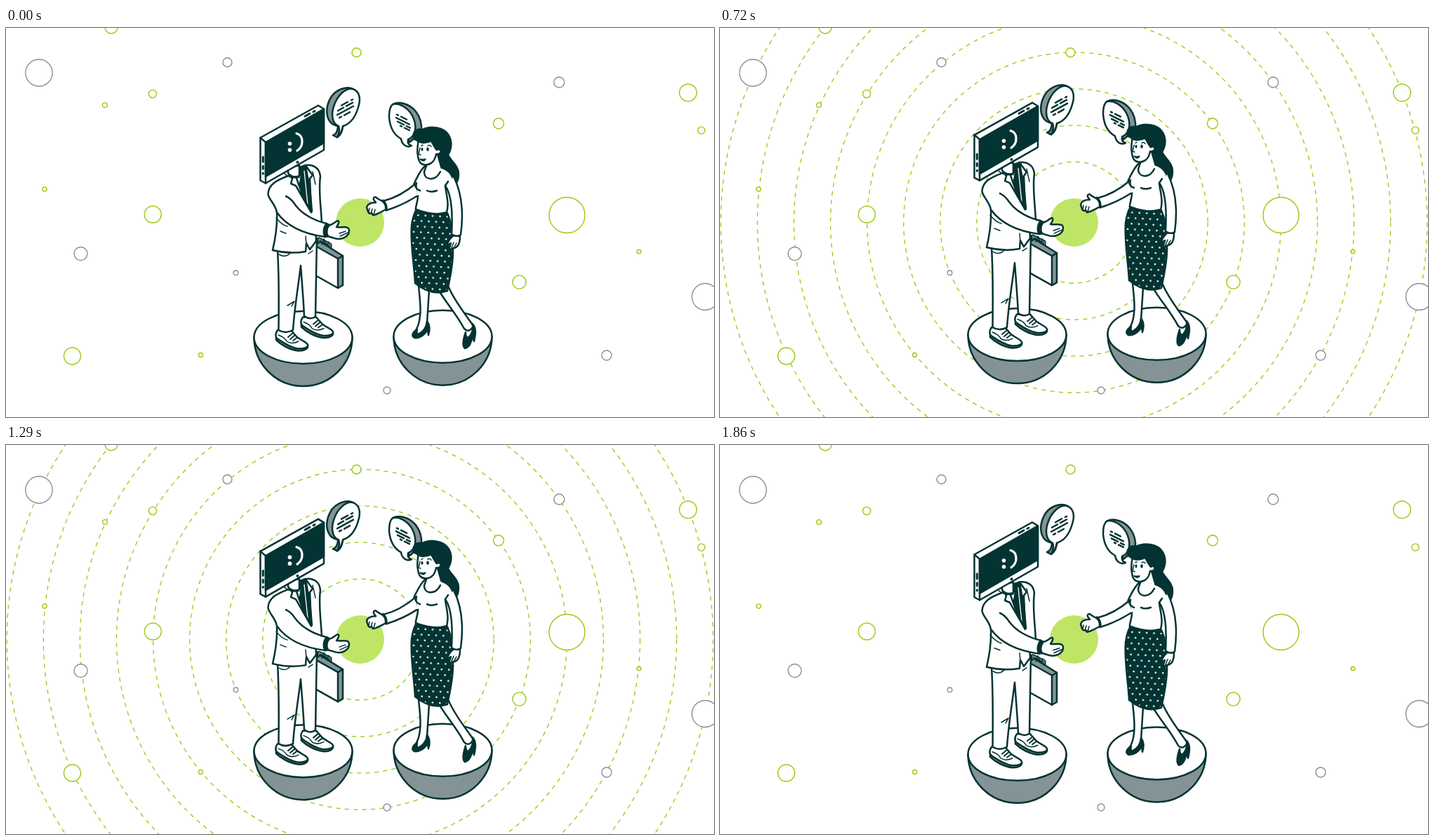
Animation of 1009x555 px, one loop 1890 ms. Source, as an HTML page:

```html
<!DOCTYPE html>
<html lang="en">
<head>
<meta charset="utf-8">
<title>Handshake</title>
<style>
  html, body { margin: 0; width: 100%; height: 100%; overflow: hidden; background: #fff; }
  svg { display: block; width: 100%; height: 100%; }
  #rings circle { fill: none; stroke: #97c911; stroke-width: 1.3; stroke-dasharray: 6.2 6.2; }
  #nodes circle { fill: #fff; stroke-width: 1.4; }
  #scene { fill: #fff; stroke: #033332; stroke-width: 2.5; stroke-linejoin: round; stroke-linecap: round; }
  .dark { fill: #033332; }
  .grey { fill: #849396; }
  .line { fill: none; }
  .thin { fill: none; stroke-width: 1.5; }
  .flat { stroke: none; }
</style>
</head>
<body>
<svg viewBox="0 0 1009 555">
  <defs>
    <pattern id="dots" width="10.4" height="16" patternUnits="userSpaceOnUse" patternTransform="translate(585 263) rotate(3)">
      <rect width="10.4" height="16" fill="#033332"/>
      <circle cx="2.6" cy="4" r="1.35" fill="#fff"/>
      <circle cx="7.8" cy="12" r="1.35" fill="#fff"/>
    </pattern>
  </defs>
  <g id="rings"></g>
  <g id="nodes"></g>
  <circle cx="504.5" cy="277.5" r="34.5" fill="#bfe567"/>

  <g id="scene">
    <!-- pedestals -->
    <g id="stand">
      <path class="grey" d="M353.5 441a70 70 0 0 0 140 0z"/>
      <ellipse cx="423.5" cy="441.5" rx="70" ry="37.5"/>
    </g>
    <use href="#stand" x="199" y="-1.3"/>

    <!-- speech bubbles -->
    <path class="grey" d="M495 87C485 82 470 88 463 99C456 111 455 125 462 134C465 138 469 139 473 140C473 147 470 152 466 153L472 156C478 152 479 147 480 141C490 130 500 110 495 87z"/>
    <path d="M494 87C504 90 506 101 502 113C498 127 490 137 480 140C479 146 477 152 472 156C475 150 476 145 474 140C465 137 463 124 467 112C472 96 484 85 494 87z"/>
    <path class="line" d="M478 110.500L487 105.500M492 103L494 102M473 118L481 113.500M485 111.300L494 106.500M472 124L495 111.500M475 128L478 126.500M482 124.500L490 120"/>

    <path class="grey" d="M551 109C560 104 575 108 584 119C591 128 593 139 592 149L575 163z"/>
    <path d="M551 109C560 106 573 114 579 125C586 139 585 154 573 159C572 164 574 167 578 168C570 172 564 165 563 158C552 152 547 140 546 127C546 118 547 112 551 109z"/>
    <path class="line" d="M557 123.500L559 124.500M563 126.500L571 130.500M556 128L575 137.500M558 133.500L567 138M571 140L576 142.500M562 139.500L564 140.500M568 142.500L575 146"/>

    <!-- briefcase -->
    <path class="line" d="M446 307V301L462 309V317" stroke-width="5"/>
    <path d="M446 307V301L462 309V317" fill="none" stroke="#849396" stroke-width="1.500"/>
    <path class="grey" d="M441 309L448 305L480 325V367L473 371z"/>
    <path d="M441 311L473 329V371L441 353z"/>
    <path class="line" d="M473 329L480 325"/>
    <path class="thin" d="M450 309L453 301L457 311L460 305"/>

    <!-- man: shoes and trousers -->
    <g id="shoe">
      <path class="grey" d="M385 441V445C392 452 404 459 416 460.500C426 461 431 457 430 453z"/>
      <path d="M387 431C383 437 384 441 387 443.500C395 449 405 456 416 457.500C426 458 431 455 430 452C428 447 419 446 413 439L406 431z"/>
      <path class="thin" d="M388 438Q397 441 400 447M400 447Q407 452 417 447"/>
      <path class="line" d="M402 441L408 436M405 444L412 438M409 446L415 441.500" stroke-width="2"/>
    </g>
    <use href="#shoe" x="36" y="-18.500"/>
    <path d="M387 317C389 350 389 390 388.500 431Q398 437 409 431C411 400 417 365 420 339C422 365 424 390 425 411Q433 417 441 412C442 370 442 340 443 300z"/>
    <path class="thin" d="M389 323Q399 329 406 320M401 396L411 390L407 397M431 322L437 318"/>

    <!-- man: jacket -->
    <path d="M402 211C386 217 374 223 373.500 237C375 246 384 251 386 263C387 284 384 300 380 317Q404 323 427 319L428 307L433 316L442 304L441 284L450 279C449 254 445 232 448 212C447 199 437 194 426 196z"/>
    <path d="M403 207L411 220L435 263L433 214L426 196z"/>
    <path class="dark" d="M416 199L425 197L429 212L433 258L417 231L421 212z"/>
    <path class="line" d="M425 204L430 252" stroke="#fff" stroke-width="1.300"/>
    <path d="M409 212L406 222L413 225L435 263C428 251 419 230 413 211zM427 196L437 210L432 216L436 262L430 214z"/>
    <path d="M402 199V207Q408 215 418 211V196z"/>
    <path class="thin" d="M396 207Q405 216 419 213M437 205L441 223M385 271Q393 281 401 283M427 297L428 309M391 290L399 293"/>
    <!-- man: reaching arm -->
    <path class="flat" d="M399 240Q406 243 412 252C422 266 440 275 457 279L455 298C424 294 401 284 386 263z"/>
    <path class="line" d="M399 240Q406 243 412 252C422 266 440 275 457 279M386 263C401 284 424 294 455 298"/>
    <path d="M458 281C465 283 467 277 473 275C476 276 473 281 471 284C478 285 483 283 487 285C490 287 489 291 488 294C485 298 480 301 474 301C467 301 463 297 456 297z"/>
    <path class="thin" d="M475 293L484 290M476 297L487 292"/>
    <path class="dark" d="M457 279L461 281C457 286 456 292 459 297L455 298C451 293 453 283 457 279z"/>

    <!-- monitor head -->
    <path d="M362.500 156.500L445 110.500L453 115.500V174L370 221.500L362.500 217.500z"/>
    <path class="dark" d="M370 163L453 115.500V164L370 212z"/>
    <path class="line" d="M362.500 156.500L370 163V221.500"/>
    <path class="line" d="M366.300 184V191M366.300 197V201M366.300 207V208M426 126L433 122M438 119.500L440 118.500" stroke-width="3"/>
    <circle class="dark flat" cx="415.500" cy="191.500" r="2"/>
    <g class="flat"><circle cx="404.500" cy="165" r="2.800"/><circle cx="404.500" cy="174" r="2.800"/></g>
    <path class="line" d="M414 150.500C424 153 425 168 415 175" stroke="#fff" stroke-width="3.200"/>

    <!-- woman: legs and shoes -->
    <path d="M588 367C589 382 592 398 590 411Q589 424 583 433Q580 440 587 440Q598 436 600 421C601 406 602 390 603 374z"/>
    <path class="dark" d="M600 418C605 425 604 432 602 438L601 430C597 438 589 443 582 442C577 439 580 433 586 430Q584 438 589 436C595 433 600 426 600 418z"/>
    <path d="M616 373C627 392 642 408 653 429Q660 436 666 425C654 407 640 391 631 370z"/>
    <path class="dark" d="M665 422C671 429 669 438 667 447L665 438C664 448 660 456 654 457C650 454 652 443 655 434Q655 442 659 442C664 437 666 430 665 422z"/>

    <!-- woman: hair, torso -->
    <path class="dark" d="M581 158C579 149 584 143 593 145C604 139 624 141 631 153C637 164 634 174 630 181C633 189 645 196 645 208C645 215 644 219 641 222C637 213 629 206 622 203C617 198 614 190 615 180L590 162z"/>
    <path d="M598 196C590 203 587 211 582 221C579 229 588 233 587 240C587 249 583 255 584 260Q606 269 628 263C632 249 627 237 626 225L638 220C636 207 629 202 620 199z"/>
    <path d="M585 221C570 234 554 243 537 247L542 260C559 255 573 248 587 239z"/>
    <path class="flat" d="M586 221L589 224V238L585 239z"/>
    <path class="line" d="M583 224Q584 230 590 232M600 232Q606 235 614 232"/>

    <!-- woman: skirt -->
    <path d="M585 259Q607 268 629 264C636 280 638 300 637 320C637 340 632 360 629 375Q606 383 583 364C582 340 576 308 578 282Q580 267 585 259z" fill="url(#dots)"/>

    <!-- woman: arms and hands -->
    <path d="M638 296C632 300 630 305 628 311L634 307L631 317L638 314C645 313 647 307 647 297z"/>
    <path class="thin" d="M638 306L634 316M642 307L638 314"/>
    <path class="flat" d="M626 225C634 236 637 260 635 294Q641 299 648 295C652 266 650 236 638 212z"/>
    <path class="line" d="M626 225C634 236 637 260 635 294Q641 299 648 295C652 266 650 236 638 212M626 225L630 219"/>
    <path class="line" d="M537 246Q543 251 542 260" stroke-width="3"/>
    <path d="M536 247L529 243C527 240 523 241 524 245L527 249C521 249 515 251 514 256L516 262C517 265 519 265 521 264L523 267L527 266C532 264 536 262 541 259Q542 251 536 247z"/>
    <path class="thin" d="M518 257L517 263M522 258L520 265M526 259L524 266"/>

    <!-- woman: head -->
    <path class="flat" d="M601 187L597 203C597 213 609 219 620 202L614 181z"/>
    <path class="line" d="M600 194L596 205C596 218 612 219 619 205"/>
    <path d="M588 158C587 166 585 177 587 182C588 192 592 196 600 195C607 194 611 190 613 180C622 181 621 171 614 173C612 167 609 164 606 161z"/>
    <path class="dark" d="M584 158C588 165 597 165 606 161C609 166 611 171 614 174L622 170L615 151L590 148z"/>
    <path class="thin" d="M590 171L588 180L591 181M592 168L594 167M601 168Q604 166 606 169"/>
    <path class="dark" d="M590 187Q594 188 598 187Q595 192 590 187z" stroke-width="1.500"/>
    <g class="dark flat"><ellipse cx="593" cy="173" rx="1.500" ry="2.500"/><ellipse cx="601" cy="173" rx="1.800" ry="2.800"/></g>
  </g>
</svg>
<script>
  const LOOP = 1890, TICK = 30, RINGS = 9, LIFT = 5.6;
  const scene = document.getElementById('scene');

  function addCircle(parent, cx, cy, r, stroke) {
    const c = document.createElementNS('http://www.w3.org/2000/svg', 'circle');
    const attrs = { cx, cy, r };
    if (stroke) attrs.stroke = stroke;
    for (const k in attrs) c.setAttribute(k, attrs[k]);
    document.getElementById(parent).append(c);
    return c;
  }

  const rings = Array.from({ length: RINGS }, (_, i) =>
    addCircle('rings', 504.5, 277.5, 86.5 + 52.1 * i));

  const green = [
    [150, -1, 9], [209, 94, 5.6], [141, 110, 3.4], [55, 230, 3.1], [209.3, 266, 12],
    [94.5, 468, 12], [277.5, 466.5, 3], [499.5, 35, 6.5], [702, 136.3, 7.5],
    [799.5, 267, 25.5], [731.5, 362.5, 9.6], [902, 319, 2.8], [972, 92.3, 12.3], [991, 146, 5.1]
  ];
  const grey = [
    [47, 64, 19.2], [315.5, 49, 6.5], [106.5, 322, 9.5], [327.5, 349.3, 3.3],
    [788.3, 77.5, 7.5], [996.5, 383.5, 19], [856, 467, 7], [543, 517, 5]
  ];
  green.forEach(n => addCircle('nodes', ...n, '#97c911'));
  grey.forEach(n => addCircle('nodes', ...n, '#849396'));

  // Rise until 1080 ms, rest, then sink from 1200 ms on.
  function lift(t) {
    if (t < 1080) return LIFT * Math.pow(t / 1080, 0.87);
    return t < 1200 ? LIFT : LIFT * (LOOP - t) / (LOOP - 1200);
  }

  function draw(t) {
    rings.forEach((ring, i) => {
      const k = i + 1;
      const on = t >= 90 + 60 * k && t < LOOP - 60 * k;
      ring.setAttribute('visibility', on ? 'visible' : 'hidden');
    });
    scene.setAttribute('transform', `translate(0 ${-lift(t).toFixed(2)})`);
  }

  const start = performance.now();
  function frame() {
    const t = (performance.now() - start) % LOOP;
    draw(Math.floor(t / TICK) * TICK);
    requestAnimationFrame(frame);
  }
  draw(0);
  requestAnimationFrame(frame);
</script>
</body>
</html>
```
